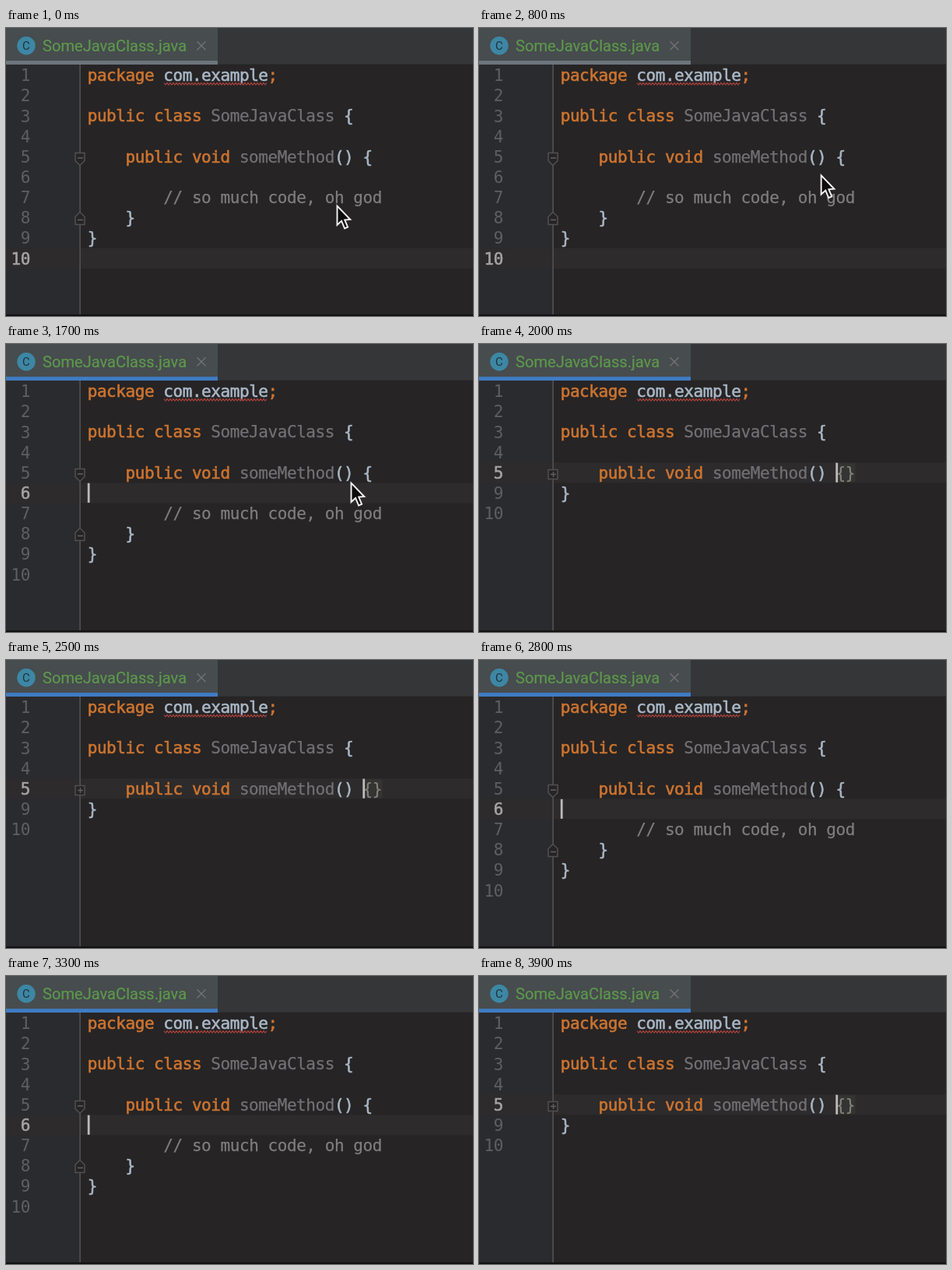
These frames come from a looping animation (600 px wide and 370 px high, 4 s). An HTML page with a canvas:

```html
<!DOCTYPE html>
<html lang="en">
<head>
<meta charset="utf-8">
<title>Code folding</title>
<style>
  html, body { margin: 0; width: 100%; height: 100%; overflow: hidden; background: #262425; }
  canvas { display: block; }
</style>
</head>
<body>
<canvas id="stage" width="600" height="370"></canvas>
<script>
const ctx = document.getElementById('stage').getContext('2d');

const LOOP = 4000;
const CLICK = 1200, FOCUS = 1300, FOLD = 1900, UNFOLD = 2700, REFOLD = 3500;
const CELL = 12.2, ROW = 26.15, LEFT = 105, TOP = 47.5;
const CODE_FONT = '21px "DejaVu Sans Mono", monospace';
const CODE_SPACING = '-0.44px';
const KEY = '#cc7430', PLAIN = '#a9b7c6', UNUSED = '#727174', COMMENT = '#7f7e7f';
const EDITOR = '#262425', GUTTER = '#2a2b2e', ACTIVE_ROW = '#2d2b2c';

// Each line is a list of [column, text, color].
const method = [[4, 'public void', KEY], [16, 'someMethod', UNUSED], [26, '()', PLAIN]];
const lines = {
  1: [[0, 'package', KEY], [8, 'com.example', PLAIN], [19, ';', KEY]],
  3: [[0, 'public class', KEY], [13, 'SomeJavaClass', UNUSED], [27, '{', PLAIN]],
  5: [...method, [29, '{', PLAIN]],
  7: [[8, '// so much code, oh god', COMMENT]],
  8: [[4, '}', PLAIN]],
  9: [[0, '}', PLAIN]]
};
const foldedMethod = [...method, [29, '{}', '#84847a']];
const openNumbers = [1, 2, 3, 4, 5, 6, 7, 8, 9, 10];
const foldedNumbers = [1, 2, 3, 4, 5, 9, 10];

const rowTop = row => TOP + row * ROW;

function rect(x, y, w, h, color) {
  ctx.fillStyle = color;
  ctx.fillRect(x, y, w, h);
}

function path(points, closed) {
  ctx.beginPath();
  points.forEach(([x, y]) => ctx.lineTo(x, y));
  if (closed) ctx.closePath();
}

function stroke(color, width) {
  ctx.strokeStyle = color;
  ctx.lineWidth = width;
  ctx.stroke();
}

function text(value, x, y, color, weight = 0) {
  ctx.fillStyle = color;
  ctx.fillText(value, x, y);
  if (weight) {
    ctx.strokeStyle = color;
    ctx.lineWidth = weight;
    ctx.strokeText(value, x, y);
  }
}

function drawTab(focused) {
  rect(0, 0, 600, 46.5, '#343638');
  rect(0, 0, 272, 42, '#474c4e');
  rect(0, 42, 272, 5, focused ? '#3f7bc2' : '#6d747c');

  ctx.beginPath();
  ctx.arc(26, 22.7, 11.7, 0, Math.PI * 2);
  ctx.fillStyle = '#3d87a4';
  ctx.fill();
  ctx.letterSpacing = '0px';
  ctx.textAlign = 'center';
  ctx.font = '15px Roboto, sans-serif';
  text('C', 26, 28, '#20323b');

  ctx.textAlign = 'left';
  ctx.font = '20.1px Roboto, sans-serif';
  text('SomeJavaClass.java', 47, 29.5, '#5d994c', 0.2);

  path([[245.5, 17.2], [256.5, 28.2]]);
  stroke('#707375', 1.4);
  path([[256.5, 17.2], [245.5, 28.2]]);
  stroke('#707375', 1.4);
}

function drawFoldMarker(points, folded, y) {
  path(points, true);
  ctx.fillStyle = EDITOR;
  ctx.fill();
  stroke('#525152', 1.5);
  path([[92, y], [99, y]]);
  stroke('#605f60', 1.5);
  if (folded) {
    path([[95.5, y - 3.5], [95.5, y + 3.5]]);
    stroke('#605f60', 1.5);
  }
}

function drawMarkers(folded) {
  if (folded) {
    drawFoldMarker([[89, 161.5], [101, 161.5], [101, 173.5], [89, 173.5]], true, 167.5);
    return;
  }
  drawFoldMarker([[89, 160.5], [101, 160.5], [101, 170.5], [95, 176.5], [89, 170.5]], false, 167);
  drawFoldMarker([[89, 252.5], [101, 252.5], [101, 242.5], [95, 236.5], [89, 242.5]], false, 246.5);
}

function drawSquiggle() {
  ctx.beginPath();
  for (let i = 0; i <= 66; i++) ctx.lineTo(203 + i * 2, i % 2 ? 73 : 70.5);
  stroke('#ad423d', 1.2);
}

function drawPointer(x, y) {
  path([[0, 0], [0, 24.5], [5.6, 19.3], [9.6, 29], [13.6, 27.2], [9.7, 18], [16.8, 17.5]]
    .map(([dx, dy]) => [x + dx, y + dy]), true);
  ctx.lineJoin = 'miter';
  ctx.fillStyle = '#0c0c0c';
  ctx.fill();
  stroke('#f4f4f4', 1.9);
}

function drawEditor(t, folded) {
  const clicked = t >= CLICK, focused = t >= FOCUS;
  const activeNumber = !focused ? 10 : folded ? 5 : 6;
  const caretRow = folded ? 4 : 5;
  const numbers = folded ? foldedNumbers : openNumbers;

  rect(0, 46.5, 600, 324, EDITOR);
  rect(0, 47, 95, 321, GUTTER);
  rect(0, rowTop(numbers.indexOf(activeNumber)), 600, ROW, ACTIVE_ROW);
  // The click repaints the text area before the gutter follows.
  if (clicked && !focused) {
    rect(LEFT, rowTop(9), 600, ROW, EDITOR);
    rect(LEFT, rowTop(5), 600, ROW, ACTIVE_ROW);
  }
  rect(94.3, 47, 1.7, 321, '#505050');
  rect(0, 368, 600, 2, '#111011');
  drawMarkers(folded);
  if (folded) rect(459, rowTop(4) + 1, 24.5, ROW - 2, '#353434');

  ctx.font = CODE_FONT;
  ctx.letterSpacing = CODE_SPACING;
  ctx.textAlign = 'left';
  numbers.forEach((number, row) => {
    const y = rowTop(row) + 20.7;
    const active = number === activeNumber;
    const label = String(number);
    text(label, 31 - label.length * CELL, y, active ? '#a5a4a5' : '#5d6063', active ? 0.6 : 0);
    const parts = folded && number === 5 ? foldedMethod : lines[number] || [];
    for (const [column, value, color] of parts) {
      text(value, LEFT - 0.3 + column * CELL, y - 0.3, color, color === KEY || color === PLAIN ? 0.6 : 0.25);
    }
  });
  drawSquiggle();
  if (clicked) rect(folded ? 458.3 : 104.8, rowTop(caretRow) + 0.5, 2.8, ROW - 1, '#bcbbbc');
}

function render(t) {
  const folded = (t >= FOLD && t < UNFOLD) || t >= REFOLD;
  drawEditor(t, folded);
  drawTab(t >= FOCUS);
  if (t < FOLD) {
    const p = Math.min(1, Math.max(0, (t - 100) / 1000));
    const eased = p * p * (3 - 2 * p);
    drawPointer(425.5 + 18 * eased, 228.5 - 50 * eased);
  }
}

function tick() {
  render(performance.now() % LOOP);
  requestAnimationFrame(tick);
}
tick();
</script>
</body>
</html>
```
